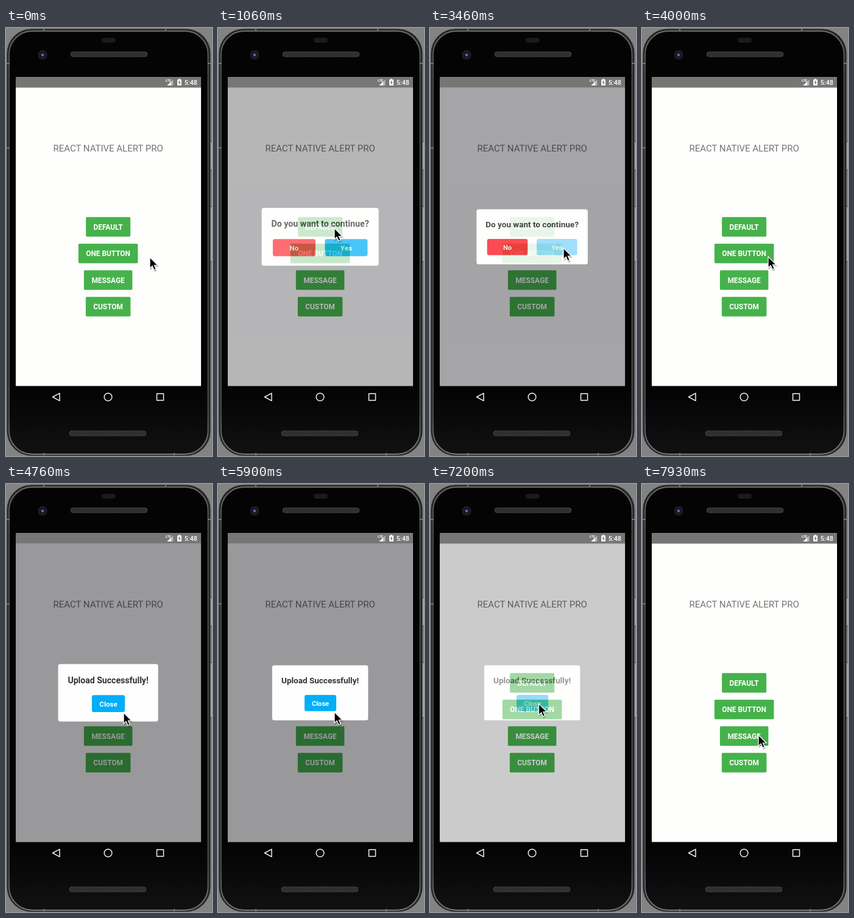
Write an HTML page that moves like this. It is 338 px wide and 700 px high and loops after 8000 ms.

```html
<!DOCTYPE html>
<html lang="en">
<head>
<meta charset="utf-8">
<title>Alert dialogs on a phone</title>
<style>
  html, body { margin: 0; width: 100%; height: 100%; overflow: hidden; background: #838383; }
  svg { display: block; width: 338px; height: 700px; font-family: Roboto, sans-serif; }
  .label { font-weight: 700; fill: #fff; text-anchor: middle; }
  .heading { font-weight: 700; font-size: 13.5px; fill: #333; text-anchor: middle; }
</style>
</head>
<body>
<svg viewBox="0 0 338 700">
  <defs>
    <pattern id="mesh" width="4" height="4" patternUnits="userSpaceOnUse">
      <rect width="4" height="4" fill="#222"/>
      <path d="M0 0L4 4M4 0L0 4" stroke="#444" stroke-width=".8"/>
    </pattern>
    <linearGradient id="rim" x2="0" y2="1">
      <stop offset="0" stop-color="#6c6c6c"/>
      <stop offset=".1" stop-color="#4c4c4c"/>
      <stop offset=".9" stop-color="#4c4c4c"/>
      <stop offset="1" stop-color="#787878"/>
    </linearGradient>
    <linearGradient id="glass" x2="0" y2="1">
      <stop offset="0" stop-color="#040405"/>
      <stop offset=".85" stop-color="#040405"/>
      <stop offset="1" stop-color="#111113"/>
    </linearGradient>
    <radialGradient id="lens">
      <stop offset="0" stop-color="#8fb0ee"/>
      <stop offset=".22" stop-color="#3c559c"/>
      <stop offset=".42" stop-color="#14182a"/>
      <stop offset=".75" stop-color="#14151a"/>
      <stop offset="1" stop-color="#353538"/>
    </radialGradient>
  </defs>

  <!-- phone -->
  <g fill="#a2a2a2" stroke="#444" stroke-width=".8">
    <rect x="334" y="186" width="6" height="46"/>
    <rect x="334" y="292" width="6" height="90"/>
  </g>
  <rect x="1.5" y="1.5" width="334" height="698" rx="40" fill="#262626"/>
  <rect x="5" y="5" width="326.5" height="692" rx="38" fill="url(#glass)" stroke="url(#rim)" stroke-width="2"/>
  <path d="M1 58h5M1 196h5M331 58h5M62 1v4M262 1v4M62 695v4M276 695v4" stroke="#777" stroke-width="2"/>
  <rect x="157" y="16" width="23" height="8" rx="4" fill="#1b1b1b"/>
  <circle cx="60" cy="44" r="7.3" fill="url(#lens)"/>
  <g fill="url(#mesh)" stroke="#4a4a4a" stroke-width=".8">
    <rect x="106" y="39" width="126" height="8" rx="4"/>
    <rect x="104" y="659" width="126" height="8" rx="4"/>
  </g>
  <g fill="none" stroke="#f2f2f2" stroke-width="1.5" stroke-linejoin="round">
    <path d="M76.5 603.5L88 597.3V609.7Z"/>
    <circle cx="167.5" cy="603.5" r="6.3"/>
    <rect x="247.5" y="598" width="11" height="11"/>
  </g>

  <!-- screen -->
  <rect x="16" y="80" width="304" height="505.5" fill="#fefefd"/>
  <rect x="16" y="80" width="304" height="17.5" fill="#767674"/>
  <g fill="#fff">
    <text x="262" y="88" font-size="5.5" font-weight="700">LTE</text>
    <path d="M264.5 94L274.5 84V94Z" opacity=".45"/>
    <path d="M264.5 94L271 87.5V94Z"/>
    <path d="M281 84.5h2v-1.5h3v1.5h2V94h-7z"/>
    <path d="M285 85.5l-2.5 4h1.7v3.2l2.5-4.2H285z" fill="#767674"/>
    <text x="292.8" y="93" font-size="10.7" font-weight="500">5:48</text>
  </g>
  <text x="167.6" y="202.3" font-size="15" fill="#757575" text-anchor="middle">REACT NATIVE ALERT PRO</text>
  <g id="menu"></g>
  <g id="modals"></g>

  <g id="cursor">
    <path d="M1 2V20L5 16.5L8 23L11 21.5L8 15H14Z" fill-opacity=".22" stroke="#000" stroke-opacity=".12" stroke-width="2"/>
    <path d="M0 0V18L4.1 14.2L7 20.8L10.1 19.5L7.4 13H13Z" stroke="#fff" stroke-width="1.2"/>
  </g>
</svg>
<script>
const LOOP = 8000, CENTER_X = 167.6, CENTER_Y = 341.5;
const byId = id => document.getElementById(id);

function add(parent, tag, attrs, text = '') {
  const el = document.createElementNS('http://www.w3.org/2000/svg', tag);
  for (const key in attrs) el.setAttribute(key, attrs[key]);
  el.textContent = text;
  return parent.appendChild(el);
}

function addButton(parent, label, cx, y, width, height, fill, size) {
  const g = add(parent, 'g', {});
  add(g, 'rect', { x: cx - width / 2, y, width, height, rx: height > 30 ? 1.8 : 3, fill });
  add(g, 'text', { x: cx, y: y + height / 2 + size * .39, 'font-size': size, class: 'label' }, label);
  return g;
}

// A modal fades as one layer: the shade with an opaque box on top.
function addModal(title, width, buttons) {
  const layer = add(byId('modals'), 'g', {});
  add(layer, 'rect', { x: 16, y: 97.5, width: 304, height: 488, fill: '#020209', 'fill-opacity': .4 });
  const box = add(layer, 'g', {});
  add(box, 'rect', { x: CENTER_X - width / 2, y: 296.5, width, height: 90, rx: 3.5, fill: '#fefefe' });
  add(box, 'text', { x: CENTER_X, y: 326.2, class: 'heading' }, title);
  const nodes = buttons.map(([label, cx, w, fill]) => addButton(box, label, cx, 345, w, 26.6, fill, 11.1));
  return { layer, box, pressable: nodes[nodes.length - 1] };
}

const menu = [['DEFAULT', 73], ['ONE BUTTON', 97.5], ['MESSAGE', 79.5], ['CUSTOM', 73.5]]
  .map(([label, width], i) => addButton(byId('menu'), label, CENTER_X, 309.2 + i * 43.5, width, 32, '#46b24b', 11.85));

const confirmModal = addModal('Do you want to continue?', 182.5,
  [['No', 127, 66.5, '#fd343d'], ['Yes', 208.3, 66.5, '#02aef8']]);
const uploadModal = addModal('Upload Successfully!', 157.5, [['Close', CENTER_X + .4, 52, '#02aef8']]);

const modals = [
  { ...confirmModal, open: 892, close: 3392 },
  { ...uploadModal, open: 4552, close: 7060 },
];
const presses = [
  { node: menu[0], down: 750, up: 890 },
  { node: confirmModal.pressable, down: 3225, up: 3392 },
  { node: menu[1], down: 4395, up: 4550 },
  { node: uploadModal.pressable, down: 6925, up: 7060 },
];

// time, x, y of the pointer tip
const path = [
  [30, 236, 375], [730, 191, 327.5], [1730, 191, 327.5], [2340, 242.5, 363.5], [2545, 236, 367.5],
  [3030, 219, 360], [3830, 219, 360], [4000, 207, 374], [4380, 193, 374], [5500, 193, 374],
  [5700, 191, 373], [5900, 191, 373], [6700, 179, 360], [6760, 179, 360], [6920, 177.7, 357],
  [7120, 177.7, 357], [7590, 188, 390], [7920, 191, 410.5], [8000, 191, 410.5],
];

const clamp = v => Math.min(1, Math.max(0, v));
const smooth = v => v * v * (3 - 2 * v);

function pointerAt(t) {
  const i = path.findIndex(p => p[0] > t);
  if (i < 1) return path[0].slice(1);
  const [t0, x0, y0] = path[i - 1], [t1, x1, y1] = path[i];
  const k = smooth((t - t0) / (t1 - t0));
  return [x0 + (x1 - x0) * k, y0 + (y1 - y0) * k];
}

function pressOpacity(t, { down, up }) {
  if (t < down) return 1;
  return .2 + .8 * smooth(clamp((t - up) / 200));
}

function render(t) {
  for (const { layer, box, open, close } of modals) {
    const alpha = clamp((t - open) / 200) ** 2 - clamp((t - close) / 200) ** 2;
    const scale = 1 + .1 * (1 - clamp((t - open) / 600)) ** 2;
    layer.setAttribute('opacity', alpha);
    box.setAttribute('transform',
      `translate(${CENTER_X} ${CENTER_Y}) scale(${scale}) translate(${-CENTER_X} ${-CENTER_Y})`);
  }
  for (const press of presses) press.node.setAttribute('opacity', pressOpacity(t, press));
  byId('cursor').setAttribute('transform', `translate(${pointerAt(t)})`);
}

const start = performance.now();
function tick() {
  render((performance.now() - start) % LOOP);
  requestAnimationFrame(tick);
}
tick();
</script>
</body>
</html>
```
